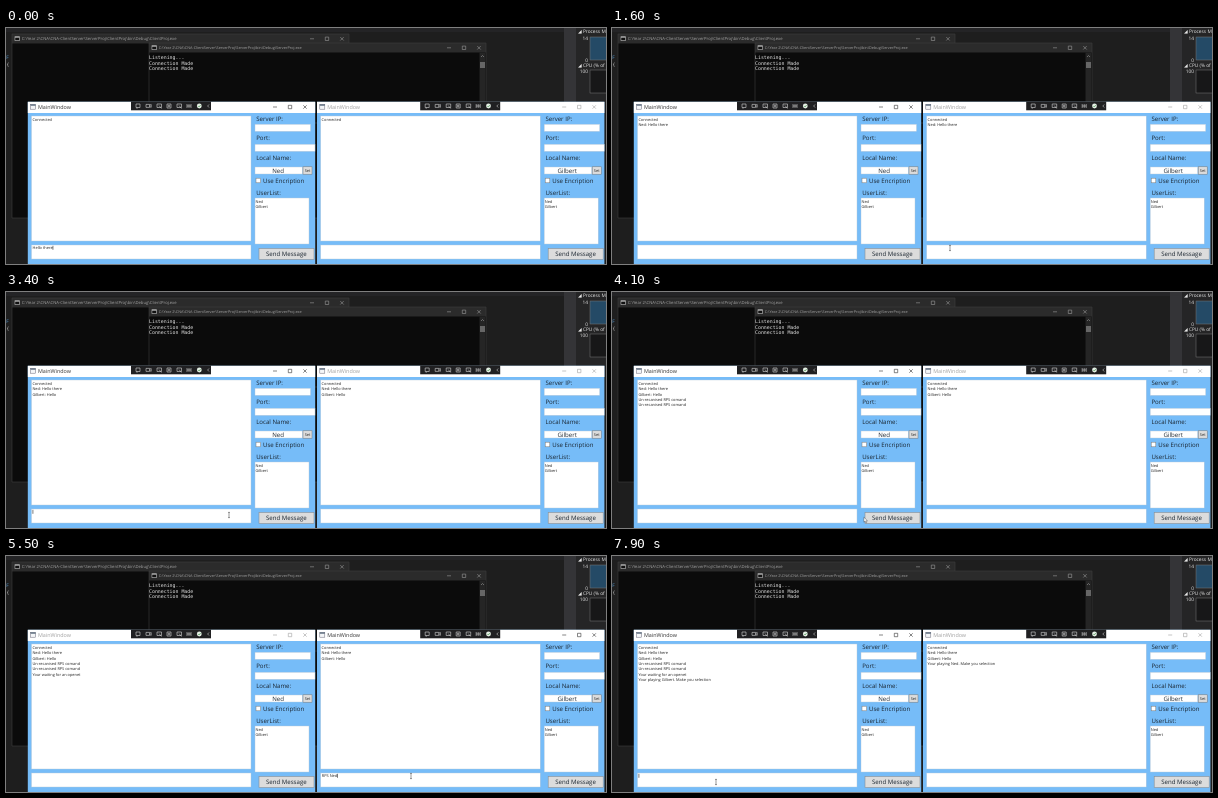
An HTML page for the animation above (8 s loop, 600 px wide and 236 px high).

```html
<!DOCTYPE html>
<html lang="en">
<head>
<meta charset="utf-8">
<title>Chat client demo</title>
<style>
html, body { margin: 0; width: 100%; height: 100%; overflow: hidden; background: #1e1e1e; }
svg { display: block; width: 600px; height: 236px; }
text { font-family: "Open Sans", "Noto Sans", sans-serif; text-rendering: geometricPrecision; white-space: pre; }
.label { font-size: 6.1px; fill: #1a2530; }
.small { font-size: 3.9px; fill: #222; }
.path { fill: #a2a2a2; }
.mono { font: 4.9px "DejaVu Sans Mono", monospace; fill: #e4e4e4; }
.diag { font-size: 4.8px; fill: #e6e6e6; }
.line { fill: none; stroke-width: .6; }
.send { fill: #dcdcdc; stroke: #8a8f94; stroke-width: .6; }
.send.hover { fill: #c3e6fb; stroke: #4d93c4; }
.chrome { fill: #333; stroke: #333; }
.inactive .chrome { fill: #a0a0a0; stroke: #a0a0a0; }
.title { font-size: 5.4px; stroke: none; }
</style>
</head>
<body>
<svg id="stage" viewBox="0 0 600 236"></svg>
<script>
const LOOP = 8000, STEP = 100;
const USERS = ["Ned", "Gilbert"];
const SHIFT = 289.2;

// One visit to an input box: focus, typing span, then send
const visits = [
  { side: 0, focus: 0, from: -500, to: 0, send: 800, text: "Hello there" },
  { side: 1, focus: 1700, from: 1850, to: 2150, send: 2600, text: "Hello" },
  { side: 0, focus: 3300, from: 3450, to: 3550, send: 3700, text: "RPS" },
  { side: 0, focus: 3850, from: 3850, to: 3950, send: 4050, text: "RPS" },
  { side: 0, focus: 4200, from: 4200, to: 4300, send: 4400, text: "Start RPS" },
  { side: 1, focus: 4700, from: 5000, to: 5400, send: 6000, text: "RPS " + USERS[0] },
  { side: 0, focus: 7300, from: LOOP, to: LOOP, send: LOOP, text: "" }
];

const shared = [[0, "Connected"], [800, USERS[0] + ": Hello there"], [2600, USERS[1] + ": Hello"]];
const playing = name => [6000, `Your playing ${name}. Make you selection`];
const logs = [
  [...shared, [3700, "Un-recanised RPS comand"], [4050, "Un-recanised RPS comand"],
    [4400, "Your waiting for an openet"], playing(USERS[1])],
  [...shared, playing(USERS[0])]
];

const pointerPath = [
  [200, 100, 224], [600, 272, 226], [900, 272, 226], [1500, 338, 220], [2200, 338, 220],
  [2550, 545, 225], [2800, 545, 225], [3300, 223, 223], [3550, 223, 223], [3700, 262, 226],
  [3850, 223, 223], [3950, 223, 223], [4050, 262, 226], [4200, 223, 223], [4300, 223, 223],
  [4400, 262, 226], [4800, 405, 220], [5500, 405, 220], [5900, 563, 224], [6400, 563, 224],
  [7200, 104, 226]
];

const rect = (x, y, w, h, fill, extra = "") =>
  `<rect x="${x}" y="${y}" width="${w}" height="${h}" fill="${fill}" ${extra}/>`;
const text = (x, y, s, cls, extra = "") => `<text x="${x}" y="${y}" class="${cls}" ${extra}>${s}</text>`;
const line = (d, stroke, extra = "") => `<path class="line" d="${d}" stroke="${stroke}" ${extra}/>`;

const buttons = (x, y, gap) =>
  `M${x - 2} ${y}h4 M${x + gap - 1.7} ${y - 1.7}h3.4v3.4h-3.4z` +
  `M${x + 2 * gap - 1.7} ${y - 1.7}l3.4 3.4m0-3.4l-3.4 3.4`;

function consoleWindow(x, y, h, size, path) {
  return rect(x, y, 337, h, "#0b0b0b") + rect(x, y, 337, 9.5, "#2b2b2b") +
    line(`M${x} ${y + h}V${y}h337v${h}z`, "#3d3d3d", 'stroke-width=".4"') +
    rect(x + 2.7, y + 2.4, 5, 4.4, "#d0d0d0") + rect(x + 3.2, y + 3.6, 4, 2.7, "#111") +
    text(x + 9.7, y + 6.2, path, "path", `font-size="${size}"`) +
    line(buttons(x + 300, y + 4.8, 15), "#9a9a9a");
}

function backdrop() {
  const root = "C:\\Year 2\\CNA\\CNA-ClientServer\\ServerProj\\";
  const output = ["Listening...", "Connection Made", "Connection Made"];
  return rect(0, 0, 600, 236, "#1e1e1e") + rect(0, 0, 600, 4, "#242426") +
    text(-1, 31, "iF", "diag", 'style="fill:#569cd6"') + text(1, 38, "{", "diag") +
    rect(558, 0, 12, 74, "#343437") + rect(570, 0, 30, 74, "#252526") +
    text(572, 4.8, "◢ Process Memory (MB)", "diag") +
    text(582, 11.8, "14", "diag", 'text-anchor="end"') +
    text(582, 33.5, "0", "diag", 'text-anchor="end"') +
    rect(584, 9, 18, 23, "#244a66", 'stroke="#777" stroke-width=".5"') +
    text(572, 38.5, "◢ CPU (% of all processors)", "diag") +
    text(582, 45, "100", "diag", 'text-anchor="end"') +
    rect(584, 42, 18, 23, "#171718", 'stroke="#777" stroke-width=".5"') +
    consoleWindow(6, 6, 184, 4.2, root + "ClientProj\\bin\\Debug\\ClientProj.exe") +
    consoleWindow(143, 15, 80, 3.8, root + "ServerProj\\bin\\Debug\\ServerProj.exe") +
    rect(473.5, 24.5, 6, 50, "#252525") + rect(474, 34, 5, 6, "#666") +
    line("M475 29l1.5-1.5 1.5 1.5", "#999") +
    output.map((s, i) => text(143, 31.2 + 5.5 * i, s, "mono")).join("");
}

function debugBar() {
  const icons = "M130 76h4v3.5h-4zM131 79.5v1.3M140 76.4h3.6v3h-3.6zM143.6 77.2l1.6-.7v2.8l-1.6-.7" +
    "M151 76h4.5v3.5h-4.5zM153 77.5l2.5 3M161 76h4v4h-4zM162.3 77.3h1.4v1.4h-1.4z" +
    "M171 76h4.5v3.5h-4.5zM173 77.5l2.5 3M181 76v4M183 76v4M185 76v4M181 78h4M203 76.5l-1.4 1.5 1.4 1.5";
  return rect(125, 73.5, 80, 8.8, "#202022") + line(icons, "#d6d6d6") +
    '<circle cx="193.3" cy="78" r="2.4" fill="#e4eee4"/>' +
    line("M192.2 78l.9 1 1.5-2", "#3c8b45");
}

function chatWindow(side) {
  const field = (x, y, w, h) => rect(x, y, w, h, "#fff", 'stroke="#b4c6d6" stroke-width=".4"');
  const label = (y, s) => text(250.2, y, s, "label");
  return `<g id="win${side}" transform="translate(${side * SHIFT})">` +
    rect(21.8, 73.8, 287.4, 162.2, "#76bcf8") + rect(21.8, 73.8, 287.4, 11.2, "#fff") +
    rect(24.6, 76.6, 5, 4.6, "#f4f6f8", 'stroke="#667" stroke-width=".5"') + rect(24.6, 76.4, 5, 1.3, "#567") +
    '<g class="chrome">' + text(32, 81.3, "MainWindow", "title") +
    `<path class="line" style="fill:none" d="${buttons(269, 79, 15)}"/></g>` + debugBar() +
    field(25.5, 88, 219.5, 125) + field(25.5, 217, 219.5, 14) +
    label(92.8, "Server IP:") + field(249, 96.3, 55.5, 7) +
    label(112.4, "Port:") + field(249, 116.3, 60, 7) +
    label(132.3, "Local Name:") + field(249, 139, 47.5, 7) +
    text(272, 144.8, USERS[side], "label", 'text-anchor="middle"') +
    rect(297, 138.8, 9, 7.4, "#dcdcdc", 'stroke="#777" stroke-width=".5"') +
    text(301.5, 143.9, "Set", "small", 'text-anchor="middle"') +
    rect(250, 150.2, 4.6, 4.6, "#fff", 'stroke="#777" stroke-width=".5"') +
    text(257, 155, "Use Encription", "label") +
    label(166.8, "UserList:") + field(249, 170, 54, 46) +
    USERS.map((s, i) => text(249.5, 174.5 + 5.4 * i, s, "small")).join("") +
    rect(253, 220.5, 55, 11, "", 'class="send"') +
    text(280.3, 228.4, "Send Message", "label", 'text-anchor="middle"') +
    logs[side].map(([at, s], i) => text(26.4, 92.8 + 5.35 * i, s, "small", `data-at="${at}"`)).join("") +
    text(26.6, 221, "", "small", 'data-input=""') +
    '<path class="line caret" stroke="#222" d="M0 217.8v4"/></g>';
}

const stage = document.getElementById("stage");
stage.innerHTML = backdrop() + chatWindow(0) + chatWindow(1) +
  '<g id="pointer"><path id="beam" class="line" stroke="#555" d="M-1-2.6h2M0-2.6v5.2M-1 2.6h2"/>' +
  '<path id="arrow" fill="#fff" stroke="#333" stroke-width=".4" d="M0 0v5l1.2-1.1.8 1.9.8-.4-.8-1.8h1.6z"/></g>';

const pointer = document.getElementById("pointer");
const beam = document.getElementById("beam");
const arrow = document.getElementById("arrow");
const wins = [0, 1].map(i => {
  const el = document.getElementById("win" + i);
  return {
    el,
    lines: [...el.querySelectorAll("[data-at]")],
    input: el.querySelector("[data-input]"),
    caret: el.querySelector(".caret"),
    send: el.querySelector(".send")
  };
});
const show = (el, on) => el.setAttribute("visibility", on ? "visible" : "hidden");

function pointerAt(t) {
  const next = pointerPath.findIndex(p => p[0] > t);
  if (next <= 0) return pointerPath.at(next).slice(1);
  const [t0, x0, y0] = pointerPath[next - 1], [t1, x1, y1] = pointerPath[next];
  const k = (t - t0) / (t1 - t0), e = k * k * (3 - 2 * k);
  return [x0 + (x1 - x0) * e, y0 + (y1 - y0) * e];
}

function draw(t) {
  const visit = visits.findLast(v => v.focus <= t);
  const typing = t >= visit.from && t < visit.to + 100;
  const [px, py] = pointerAt(t);
  let overInput = false;

  wins.forEach((w, side) => {
    const active = visit.side === side, editing = active && t < visit.send;
    const x = px - side * SHIFT;
    overInput ||= x > 25 && x < 245 && py > 217 && py < 231;
    w.el.classList.toggle("inactive", !active);
    w.send.classList.toggle("hover", !typing && x > 253 && x < 308 && py > 220 && py < 232);
    w.lines.forEach(l => show(l, t >= +l.dataset.at));

    const part = Math.min(1, Math.max(0, (t - visit.from) / (visit.to - visit.from || 1)));
    w.input.textContent = editing ? visit.text.slice(0, Math.round(part * visit.text.length)) : "";
    const end = w.input.textContent ? w.input.getComputedTextLength() : 0;
    w.caret.setAttribute("transform", `translate(${26.9 + end})`);
    show(w.caret, editing);
  });

  pointer.setAttribute("transform", `translate(${px} ${py})`);
  show(beam, !typing && overInput);
  show(arrow, !typing && !overInput);
}

const start = performance.now();
function tick() {
  const t = (performance.now() - start) % LOOP;
  draw(Math.floor(t / STEP) * STEP);
  requestAnimationFrame(tick);
}
tick();
</script>
</body>
</html>
```
